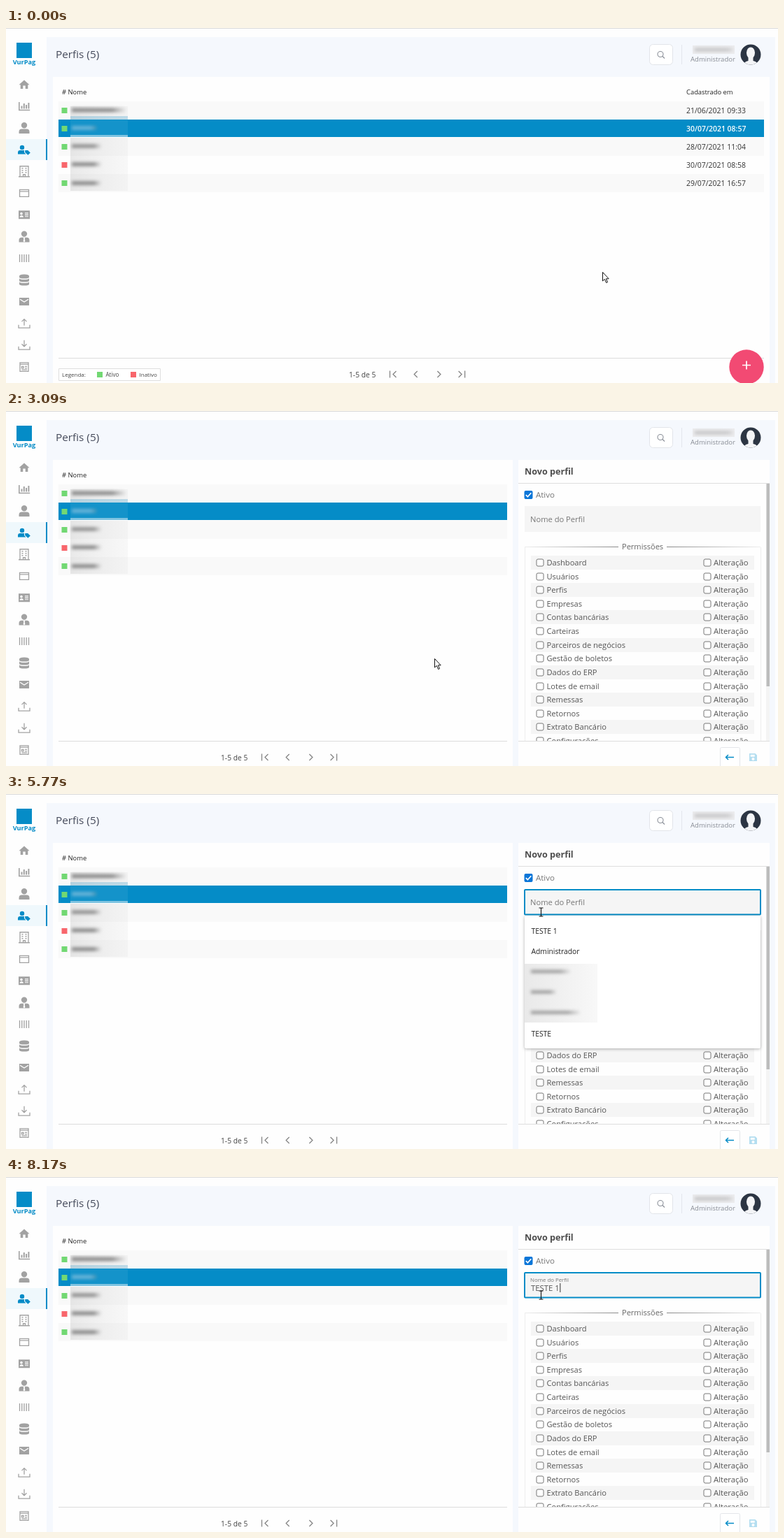
These frames come from a looping animation (1103 px wide and 508 px high, 8250 ms). An HTML page with a canvas:

```html
<!DOCTYPE html>
<html lang="pt-BR">
<head>
<meta charset="utf-8">
<title>Perfis</title>
<style>
html, body { margin: 0; width: 100%; height: 100%; overflow: hidden; background: #fff; }
canvas { display: block; }
</style>
</head>
<body>
<canvas id="stage" width="1103" height="508"></canvas>
<script>
const ctx = document.getElementById('stage').getContext('2d');
const LOOP = 8250;
const BLUE = '#058cc7', GREEN = '#72d873', RED = '#f8666c', ICON = '#a2a2a2';
const HOVER = 760, OPEN = 1500, FOCUS = 4800;

// time, x, y of the pointer
const PATH = [
  [0, 852, 349], [180, 852, 349], [300, 880, 368], [380, 898, 383], [470, 930, 405],
  [640, 1020, 455], [800, 1071, 470], [1690, 1071, 470], [1760, 1056, 469],
  [1980, 960, 448], [2180, 828, 417], [2330, 708, 387], [2410, 674, 376],
  [2490, 646, 369], [2590, 612, 354], [3150, 612, 354], [3270, 658, 318],
  [3370, 714, 280], [3440, 735, 260], [3620, 793, 178], [3900, 797, 159],
  [5450, 797, 159], [5750, 764, 169]
];
const KEYS = [[6180, 'T'], [6330, 'E'], [6600, 'S'], [6760, 'T'], [7050, 'E'], [7500, ' '], [7950, '1']];
const DATES = ['21/06/2021 09:33', '30/07/2021 08:57', '28/07/2021 11:04', '30/07/2021 08:58', '29/07/2021 16:57'];
const PERMISSIONS = ['Dashboard', 'Usuários', 'Perfis', 'Empresas', 'Contas bancárias', 'Carteiras',
  'Parceiros de negócios', 'Gestão de boletos', 'Dados do ERP', 'Lotes de email', 'Remessas',
  'Retornos', 'Extrato Bancário', 'Configurações'];

function rect(x, y, w, h, color) {
  ctx.fillStyle = color;
  ctx.fillRect(x, y, w, h);
}

function rounded(x, y, w, h, r, fill, stroke, width = 1) {
  ctx.beginPath();
  ctx.roundRect(x, y, w, h, r);
  if (fill) { ctx.fillStyle = fill; ctx.fill(); }
  if (stroke) { ctx.strokeStyle = stroke; ctx.lineWidth = width; ctx.stroke(); }
}

function disc(x, y, rx, ry, color) {
  ctx.beginPath();
  ctx.ellipse(x, y, rx, ry, 0, 0, 7);
  ctx.fillStyle = color;
  ctx.fill();
}

function setFont(size, weight = 400) {
  ctx.font = `${weight} ${size}px "Open Sans", "Noto Sans", sans-serif`;
}

function text(str, x, y, size, color, weight) {
  setFont(size, weight);
  ctx.fillStyle = color;
  ctx.fillText(str, x, y);
}

function shape(x, y, d, fill, stroke, width = 1.3) {
  const path = new Path2D(d);
  ctx.save();
  ctx.translate(x, y);
  if (fill) { ctx.fillStyle = fill; ctx.fill(path, 'evenodd'); }
  if (stroke) { ctx.strokeStyle = stroke; ctx.lineWidth = width; ctx.stroke(path); }
  ctx.restore();
}

function smudge(x, y, w, h, color) {
  const fade = ctx.createLinearGradient(x, 0, x + w, 0);
  fade.addColorStop(0, color);
  fade.addColorStop(.75, color);
  fade.addColorStop(1, 'rgba(160,160,160,0.1)');
  ctx.save();
  ctx.filter = 'blur(2px)';
  rect(x, y - h / 2, w, h, fade);
  ctx.restore();
}

const BUST = 'M0-8a4.2 4.2 0 0 1 0 8.4a4.2 4.2 0 0 1 0-8.4z M-7.5 8v-2.6q0-4 4-4h7q4 0 4 4v2.6z';
const TRAY = 'M-8 2v4.5h16v-4.5';
const ICONS = [
  ['M0-6.5L7.5.3H5.3V6H1.7V1.6H-1.7V6H-5.3V.3H-7.5z'],
  ['M-8-6h1.6v10.8h14.6v1.5h-16.2z M-4.5-.5h2v4h-2z M-1.2-4h2v7.500h-2z M2.1-2h2v5.500h-2z M5.400-5h2v8.500h-2z'],
  [BUST],
  ['M-3-6.500a3.200 3.200 0 0 1 0 6.400a3.200 3.200 0 0 1 0-6.400z M-9 6.200v-2.200q0-3.200 3.200-3.200h5.800v3l2.400 2.400z M1.200.8h4l3.600 3.400-3.400 3.300-4.200-3.800z'],
  ['M-6-7.500h12v15h-12z M-8 7.500h16 M-3.500-4.500h2 M1.500-4.500h2 M-3.500-1.500h2 M1.500-1.500h2 M-3.500 1.500h2 M1.500 1.500h2 M-1.500 7.500v-3h3v3', 1],
  ['M-6.500-5h13v10h-13z M-6.500-2.500h13', 1],
  ['M-8-6h16v12h-16z M-4-3.500a1.800 1.800 0 1 0 .01 0z M-6.500 3.500h5.400q0-2.600-2.700-2.600t-2.700 2.600z M1-3h5v1.200h-5z M1-.6h5v1.200h-5z M1 1.800h5v1.200h-5z'],
  [BUST + 'M-1.300 1.500h2.600l-.6 2 .7 3-1.400 1.500-1.400-1.500.7-3z'],
  ['M-6.500-5.500v11 M-3.250-5.500v11 M0-5.500v11 M3.250-5.500v11 M6.500-5.500v11', 1],
  ['M-7-5.500q0-2.500 7-2.500t7 2.500v1.500q0 2-7 2t-7-2z M-7-2q2 1.500 7 1.500t7-1.500v3q0 2-7 2t-7-2z M-7 3q2 1.500 7 1.500t7-1.500v3q0 2-7 2t-7-2z'],
  ['M-7-5.500h14v11h-14z M-6-4v1.500l6 3.700 6-3.700v-1.500l-6 3.700z'],
  [TRAY + 'M0 3v-9 M-3.500-2.500l3.500-3.500 3.500 3.500', 1],
  [TRAY + 'M0-7v9 M-3.500-1.500l3.500 3.500 3.500-3.500', 1],
  ['M-6-6h12v12.500h-12z M-6-3.700h12 M-3.500-.5h2.500v2.500h-2.500z M1-.5h3 M1 2h3 M-3.500 4.300h7.500', 1]
];

function sidebar() {
  rect(0, 159, 58, 30, '#eff8fc');
  rect(57, 159, 2, 30, BLUE);
  rect(15, 21, 22, 22, BLUE);
  text('VurPag', 9.700, 52, 9.200, BLUE, 700);
  ICONS.forEach(([d, outline], i) => {
    const color = i === 3 ? BLUE : ICON;
    shape(26, 81 + i * 31.060, d, outline ? null : color, outline ? color : null);
  });
}

function header() {
  text('Perfis (5)', 71, 43, 15.300, '#454a5a');
  rounded(919.500, 23.500, 33, 29, 5, '#fff', '#e2e5ea');
  shape(935, 37.500, 'M4 0a4 4 0 1 1-8 0a4 4 0 1 1 8 0z M3 3l3 3', null, '#8a8f98', 1.100);
  rect(965, 24, 1, 28, '#e3e6ec');
  rect(981, 25, 60, 12, '#ececee');
  smudge(984, 31, 55, 5, '#c6c6c8');
  text('Administrador', 978, 48, 9.550, '#888c94');

  ctx.save();
  ctx.beginPath();
  ctx.arc(1064, 38, 14.500, 0, 7);
  ctx.clip();
  rect(1049, 23, 30, 30, '#2c3543');
  disc(1064, 35.500, 6, 8, '#f4f5f7');
  rect(1060.500, 41, 7, 8, '#f4f5f7');
  disc(1064, 52, 9.500, 5.500, '#f4f5f7');
  ctx.restore();
}

function blurredNames() {
  const veil = ctx.createLinearGradient(92, 0, 174, 0);
  veil.addColorStop(0, 'rgba(150,150,150,.2)');
  veil.addColorStop(1, 'rgba(190,190,190,.1)');
  rect(92, 112, 82, 19, veil);
  rect(92, 126, 82, 5, 'rgba(90,170,205,.35)');
  rect(92, 131, 82, 25, 'rgba(255,255,255,.06)');
  rect(92, 153, 82, 3, 'rgba(215,235,243,.55)');
  rect(92, 157, 82, 76, veil);
  smudge(94, 117.500, 77, 6, '#8f8f8f');
  smudge(94, 143, 36, 6, '#64b2d7');
  smudge(94, 169, 42, 6, '#989898');
  smudge(94, 195, 42, 6, '#929292');
  smudge(94, 222, 42, 6, '#929292');
}

function table(open) {
  const right = open ? 716 : 1083;
  rect(67, 70, open ? 657 : 1024, 438, '#fefefe');
  text('# Nome', 80, 95, 9.400, '#222');
  if (!open) text('Cadastrado em', 972, 95, 9.400, '#222');
  DATES.forEach((date, i) => {
    const mid = 117.800 + i * 26.150, active = i === 1;
    if (active) rect(75, 131, right - 75, 25, BLUE);
    else if (i % 2 === 0) rect(75, Math.round(mid - 13), right - 75, 26, '#f9f9f9');
    rect(79.500, Math.round(mid - 4), 8, 8, i === 3 ? RED : GREEN);
    if (!open) text(date, 972, mid + 4, 10.460, active ? '#fff' : '#333', active ? 600 : 400);
  });
  blurredNames();
  rect(75, 472, right - 75, 1, '#dcdcdc');

  const dx = open ? -183 : 0;
  text('1-5 de 5', 490 + dx, 500, 10.250, '#444');
  const arrows = ['M-4.500-5v10 M4.500-4.500l-4.500 4.500 4.500 4.500', 'M2-4.500l-4.500 4.500 4.500 4.500',
    'M-2-4.500l4.500 4.500-4.500 4.500', 'M4.500-5v10 M-4.500-4.500l4.500 4.500-4.500 4.500'];
  arrows.forEach((d, i) => shape(553 + i * 32.700 + dx, 495.500, d, null, '#858585'));
  if (open) return;
  rounded(75.500, 487.500, 145, 17, 0, '#fff', '#dedede');
  text('Legenda:', 80, 499, 8, '#444');
  rect(130, 492, 8, 8, GREEN);
  text('Ativo', 142.500, 499, 8.100, '#444');
  rect(178, 492, 8, 8, RED);
  text('Inativo', 190.500, 499, 8, '#444');
}

function addButton(hover) {
  disc(1058, 485, 24.700, 24.700, hover ? '#dc4269' : '#f24a73');
  shape(1058, 482.500, 'M-6 0h12 M0-6v12', null, '#fff', 1.700);
}

function checkbox(x, y) {
  rounded(x + .5, y - 5, 10, 10, 2, '#fff', '#777');
}

function legendLine(x, w, from, to) {
  const fade = ctx.createLinearGradient(x, 0, x + w, 0);
  fade.addColorStop(0, from);
  fade.addColorStop(1, to);
  rect(x, 194, w, 1, fade);
}

function permissions() {
  legendLine(741, 134, '#eee', '#888');
  legendLine(944, 134, '#888', '#eee');
  text('Permissões', 880, 198, 11.050, '#666');
  ctx.save();
  ctx.beginPath();
  ctx.rect(732, 195, 359, 277);
  ctx.clip();
  rect(741, 195, 1, 277, '#eee');
  rect(1078, 195, 1, 277, '#eee');
  PERMISSIONS.forEach((name, i) => {
    const y = 217 + i * 19.620;
    if (i % 2 === 0) rect(750, Math.round(y - 10), 319, 20, '#f5f5f5');
    checkbox(757.500, Math.round(y));
    checkbox(996.500, Math.round(y));
    text(name, 772.500, y + 4, 11.100, '#555');
    text('Alteração', 1011, y + 4, 11.300, '#555');
  });
  ctx.restore();
}

function field(t, typed, last) {
  const focused = t >= FOCUS;
  rect(741, 136, 337, 37, '#f5f5f5');
  if (focused) rounded(741, 137, 337, 35.500, 1, null, BLUE, 2);
  if (typed) {
    text('Nome do Perfil', 749, 150, 7.850, '#757575');
    text(typed, 750, 163, 11.350, '#555');
  } else {
    text('Nome do Perfil', 749, 159, 11.150, '#777');
  }
  if (focused && (t - last) % 1000 < 500) {
    setFont(11.350);
    const x = typed ? 750.500 + ctx.measureText(typed).width : 749;
    rect(x, typed ? 152 : 148, 1, 13, '#333');
  }
}

function suggestions(typed) {
  const items = !typed ? ['TESTE 1', 'Administrador', '', '', '', 'TESTE']
    : ['TESTE 1', 'TESTE', 'TESTE 2'].filter(s => s.startsWith(typed));
  if (typed === 'TESTE 1') return;
  ctx.save();
  ctx.shadowColor = 'rgba(0,0,0,.3)';
  ctx.shadowBlur = 4;
  ctx.shadowOffsetY = 1;
  rounded(741, 174, 337, items.length * 29.400 + 13.500, 2, '#fff');
  ctx.restore();
  if (!typed) {
    const veil = ctx.createLinearGradient(741, 0, 845, 0);
    veil.addColorStop(0, '#e9e9e9');
    veil.addColorStop(1, '#f8f8f8');
    rect(741, 243, 104, 84, veil);
    [56, 36, 70].forEach((w, i) => smudge(750, 254 + i * 29.300, w, 5, '#a2a2a2'));
  }
  items.forEach((s, i) => text(s, 750.500, 199.700 + i * 29.400, 10.300, '#222', 500));
}

function panel(t, typed, last) {
  rect(732, 70, 359, 438, '#fefefe');
  text('Novo perfil', 741, 91, 12.600, '#4d4d4d', 700);
  rect(732, 103, 359, 1, '#dedede');
  rect(1086, 104, 5, 368, '#f4f4f4');
  rect(1086.500, 104, 4.500, 290, '#bcbcbc');
  rounded(740.500, 114, 12, 12, 2, '#0b76d8');
  shape(746.500, 120, 'M-3.700 0l2.500 2.700 5-5.500', null, '#fff', 1.700);
  text('Ativo', 757, 124, 11.500, '#777');
  permissions();
  rect(732, 472, 359, 1, '#dedede');
  rounded(1020.500, 481.500, 28, 30, 2, '#fff', '#e4e6ea');
  shape(1034, 495.500, 'M6 0h-11.500 M-2-3.500l-3.500 3.500 3.500 3.500', null, BLUE, 1.500);
  shape(1067.500, 495.500, 'M-5.500-5.500h8.500l2.500 2.500v8.500h-11z M-3.800-3.800v3h6v-3z M0 .6a2 2 0 1 0 .01 0z', '#b4def0');
  field(t, typed, last);
  if (t >= FOCUS) suggestions(typed);
}

function pointer(t) {
  let [, x, y] = PATH[PATH.length - 1];
  const i = PATH.findIndex(p => p[0] > t);
  if (i > 0) {
    const [t0, x0, y0] = PATH[i - 1], [t1, x1, y1] = PATH[i];
    const k = (t - t0) / (t1 - t0);
    x = x0 + (x1 - x0) * k;
    y = y0 + (y1 - y0) * k;
  }
  x = Math.round(x);
  y = Math.round(y);
  const overField = t >= OPEN && x > 741 && x < 1078 && y > 136 && y < 173;
  if (overField) shape(x + .5, y, 'M-3-6h2.300l.7.700.7-.7h2.300 M0-5.500v11 M-3 6h2.300l.7-.7.7.700h2.300', null, '#111', 1.100);
  else shape(x + .5, y + .5, 'M0 0V12.500L2.900 9.900 5.100 15 7 14.200 4.900 9.300H8.700z', '#fff', '#111', 1);
}

function draw(t) {
  const keys = KEYS.filter(k => k[0] <= t);
  const typed = keys.map(k => k[1]).join('');
  const last = keys.length ? keys[keys.length - 1][0] : FOCUS;
  const open = t >= OPEN;
  rect(0, 0, 1103, 508, '#fefefe');
  rect(0, 0, 1103, 1, '#dadada');
  rect(58, 13, 1041, 495, '#f5f8fd');
  sidebar();
  header();
  table(open);
  if (open) panel(t, typed, last);
  else addButton(t >= HOVER);
  pointer(t);
}

const start = performance.now();
function tick() {
  draw((performance.now() - start) % LOOP);
  requestAnimationFrame(tick);
}
tick();
</script>
</body>
</html>
```
